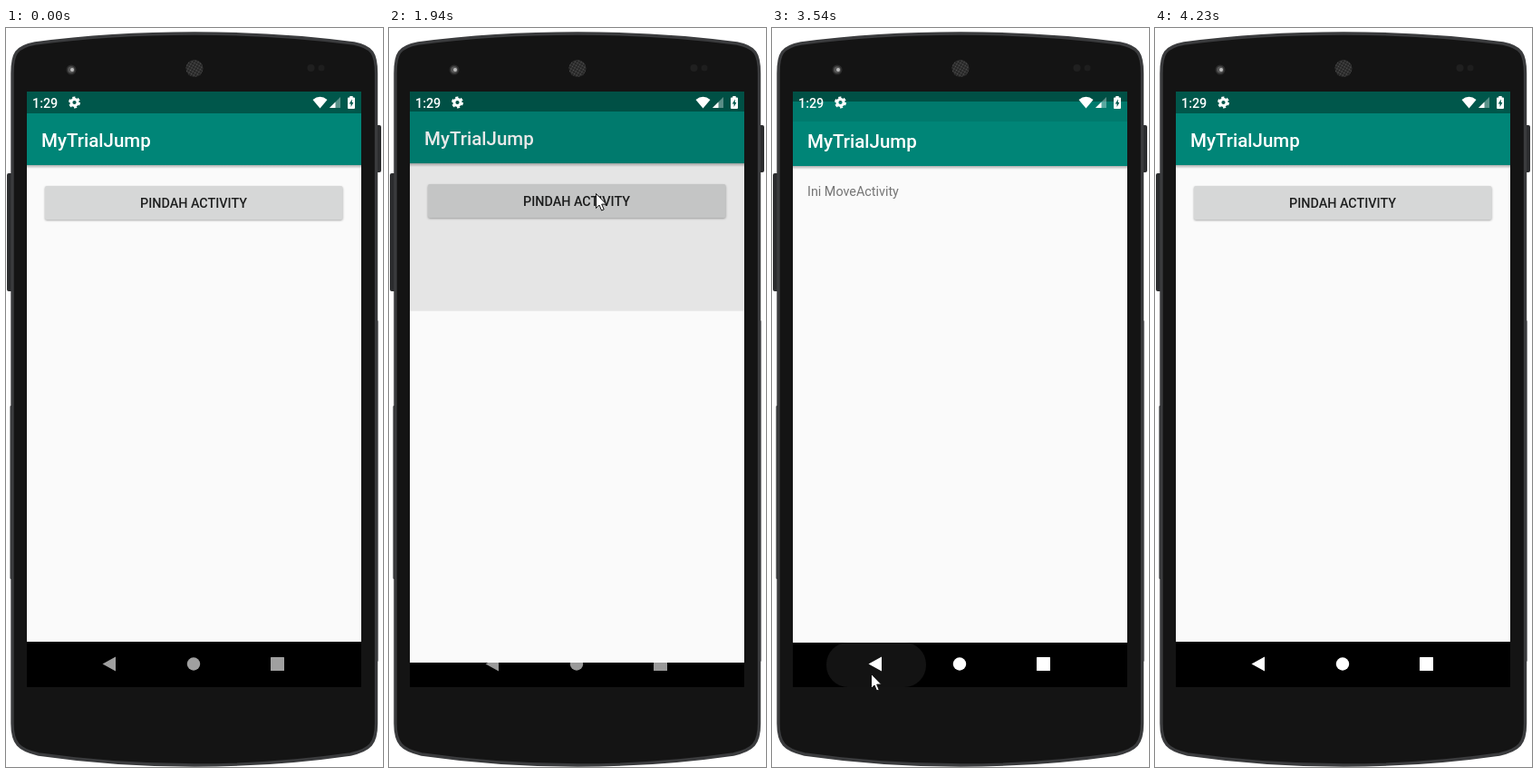
Write an HTML page that moves like this. It is 416x814 px and loops after 4630 ms.

```html
<!DOCTYPE html>
<html lang="id">
<head>
<meta charset="utf-8">
<title>Pindah Activity</title>
<style>
html, body { margin: 0; width: 100%; height: 100%; overflow: hidden; background: #fff; }
svg { display: block; width: 416px; height: 814px; }
text { font-family: Roboto, "Noto Sans", sans-serif; font-size: 14.35px; }
.medium { font-weight: 500; }
.title { font-size: 20.5px; font-weight: 500; fill: #fff; }
.button { fill: #d6d7d7; filter: drop-shadow(0 1px 1px rgba(0, 0, 0, .32)); }
</style>
</head>
<body>
<svg viewBox="0 0 416 814">
  <defs>
    <linearGradient id="shade" x2="0" y2="1">
      <stop stop-opacity=".3"/><stop offset="1" stop-opacity="0"/>
    </linearGradient>
    <pattern id="mesh" width="3" height="3" patternUnits="userSpaceOnUse" patternTransform="rotate(30)">
      <circle cx="1.5" cy="1.5" r=".95" fill="#525252"/>
    </pattern>
    <clipPath id="screenClip"><rect x="23" y="70" width="369" height="656"/></clipPath>
    <clipPath id="buttonClip"><rect x="43" y="174" width="328.5" height="37" rx="2"/></clipPath>
    <clipPath id="revealClip"><rect id="reveal" x="23" width="369" height="700"/></clipPath>
    <g id="page">
      <rect x="23" y="70" width="369" height="606" fill="#fafafa"/>
      <rect x="23" y="70" width="369" height="81" fill="#008577"/>
      <rect x="23" y="70" width="369" height="24" fill="#00574b"/>
      <rect x="23" y="151" width="369" height="4" fill="url(#shade)"/>
      <text class="title" x="39" y="131">MyTrialJump</text>
    </g>
  </defs>

  <!-- phone -->
  <g fill="#2b2c2e">
    <rect x="1" y="160" width="7" height="130" rx="2"/>
    <rect x="407" y="107" width="7" height="52" rx="2"/>
    <rect x="4.5" y="416" width="4" height="191" rx="1"/>
    <rect x="407" y="322" width="3.5" height="376" rx="1"/>
  </g>
  <path fill="#141414" stroke="#3a3b3d" stroke-width="3.400"
    d="M7 50C7 28 11 21 32 17Q115 6 208 6Q301 6 384 17C404 21 408.500 28 408.500 50V766C408.500 788 402 795 380 800Q296 812 208 812Q120 812 36 800C14 795 7 788 7 766Z"/>
  <circle cx="72" cy="46" r="5.500" fill="#2c2c2c"/>
  <circle cx="72" cy="46" r="3.800" fill="#555"/>
  <circle cx="73" cy="46" r="2" fill="#bbb"/>
  <circle cx="208" cy="44.500" r="9.500" fill="#222"/>
  <circle cx="208" cy="44.500" r="9.500" fill="url(#mesh)"/>
  <circle cx="336.500" cy="44" r="4" fill="#202020"/>
  <circle cx="348" cy="44" r="3.500" fill="#1e1e1e"/>

  <g clip-path="url(#screenClip)">
    <rect x="23" y="70" width="369" height="656"/>
    <rect id="navRipple" y="677" height="49" fill="#fff"/>
    <g id="nav">
      <path d="M106.500 700.500L121 692.500V708.500Z"/>
      <circle cx="207" cy="700.500" r="7.200"/>
      <rect x="292" y="693" width="15" height="15" rx=".5"/>
    </g>

    <g id="home">
      <use href="#page"/>
      <rect class="button" x="43" y="174" width="328.500" height="37" rx="2"/>
      <g clip-path="url(#buttonClip)"><circle id="tap" cx="228" cy="182"/></g>
      <text class="medium" x="207" y="198" text-anchor="middle" fill="#1e1f1f">PINDAH ACTIVITY</text>
      <rect id="dim" x="23" y="70" width="369" height="606"/>
    </g>

    <g clip-path="url(#revealClip)">
      <g id="moved">
        <use href="#page"/>
        <text x="39" y="183.500" fill="#757575">Ini MoveActivity</text>
      </g>
    </g>

    <!-- status icons -->
    <g fill="#fff">
      <text class="medium" x="29" y="87.500">1:29</text>
      <circle cx="75.500" cy="82" r="3.600" fill="none" stroke="#fff" stroke-width="3"/>
      <circle cx="75.500" cy="82" r="5.500" fill="none" stroke="#fff" stroke-width="2" stroke-dasharray="3.100 2.660"/>
      <path d="M338.500 79Q346.500 72.500 354.500 79L346.500 88.500Z"/>
      <path d="M369 76V88H357Z" opacity=".35"/>
      <path d="M363.500 81.500V88H357Z"/>
      <path d="M377 77.500Q377 76.500 378 76.500H379.300V75H382.700V76.500H384Q385 76.500 385 77.500V88Q385 89 384 89H378Q377 89 377 88Z"/>
      <path d="M381.800 78.500L378.800 83.500H380.600V87L383.400 82H381.800Z" fill="#00574b"/>
    </g>
  </g>

  <path id="cursor" fill="#fff" stroke="#111" stroke-width="1" stroke-linejoin="round"
    d="M.5 .5V16.500L4 13L6.600 19L9.200 17.900L6.700 12.100H11.700Z"/>
</svg>

<script>
const LOOP = 4630;
const STEP = 460 / 6;  // the picture refreshes in steps of this length
const PHASE = 6;

const set = (id, attrs) => {
  const node = document.getElementById(id);
  for (const name in attrs) node.setAttribute(name, attrs[name]);
};
const ramp = (t, start, length) => Math.min(1, Math.max(0, (t - start) / length));
const easeOut = u => 1 - (1 - u) ** 2;
const smooth = u => u * u * (3 - 2 * u);
const fastOutSlowIn = u => smooth(easeOut(u));

const button = [228, 182], below = [74, 751], back = [109, 711];
const moves = [
  { start: 500, length: 540, from: [338, 815], bend: [300, 440], to: button },
  { start: 2330, length: 520, from: button, bend: [103, 457], to: below },
  { start: 2850, length: 310, from: below, bend: [92, 737], to: back },
  { start: 3690, length: 540, from: back, bend: [215, 805], to: [345, 805] }
];

// Each move follows an eased quadratic curve.
function pointer(t) {
  const { start, length, from, bend, to } = moves.filter(m => m.start <= t).pop() || moves[0];
  const e = smooth(ramp(t, start, length));
  return from.map((a, i) => a * (1 - e) ** 2 + 2 * bend[i] * e * (1 - e) + to[i] * e * e);
}

function draw(t) {
  // 0 = home, 1 = second page
  const page = fastOutSlowIn(ramp(t, 1870, 400)) - fastOutSlowIn(ramp(t, 3507, 500));
  const shown = easeOut(ramp(t, 1870, 134)) - smooth(ramp(t, 3502, 226));
  set("home", { transform: `translate(0 ${Math.round(-13 * page)})` });
  set("moved", { transform: `translate(0 ${Math.round(27 * (1 - page))})` });
  set("reveal", { y: 726 - 656 * shown });
  set("dim", { opacity: .085 * (ramp(t, 1860, 60) - ramp(t, 3660, 220)) });

  set("tap", {
    r: 12 + 230 * smooth(ramp(t, 1400, 240)),
    opacity: t < 1300 ? 0 : .1 * (1 - ramp(t, 1640, 220))
  });

  const w = 110 * easeOut(ramp(t, 3290, 170));
  set("navRipple", {
    x: 115 - w / 2, width: w, rx: Math.min(24, w / 2),
    opacity: .075 * (1 - ramp(t, 3540, 140))
  });
  set("nav", { fill: t < 80 ? "#a0a0a0" : t < 3300 ? "#999" : "#fff" });

  set("cursor", {
    transform: `translate(${pointer(t)})`,
    visibility: t > 500 && t < 4200 ? "visible" : "hidden"
  });
}

const start = performance.now();
function frame() {
  const t = (performance.now() - start) % LOOP;
  draw(PHASE + STEP * Math.floor((t - PHASE) / STEP));
  requestAnimationFrame(frame);
}
frame();
</script>
</body>
</html>
```
